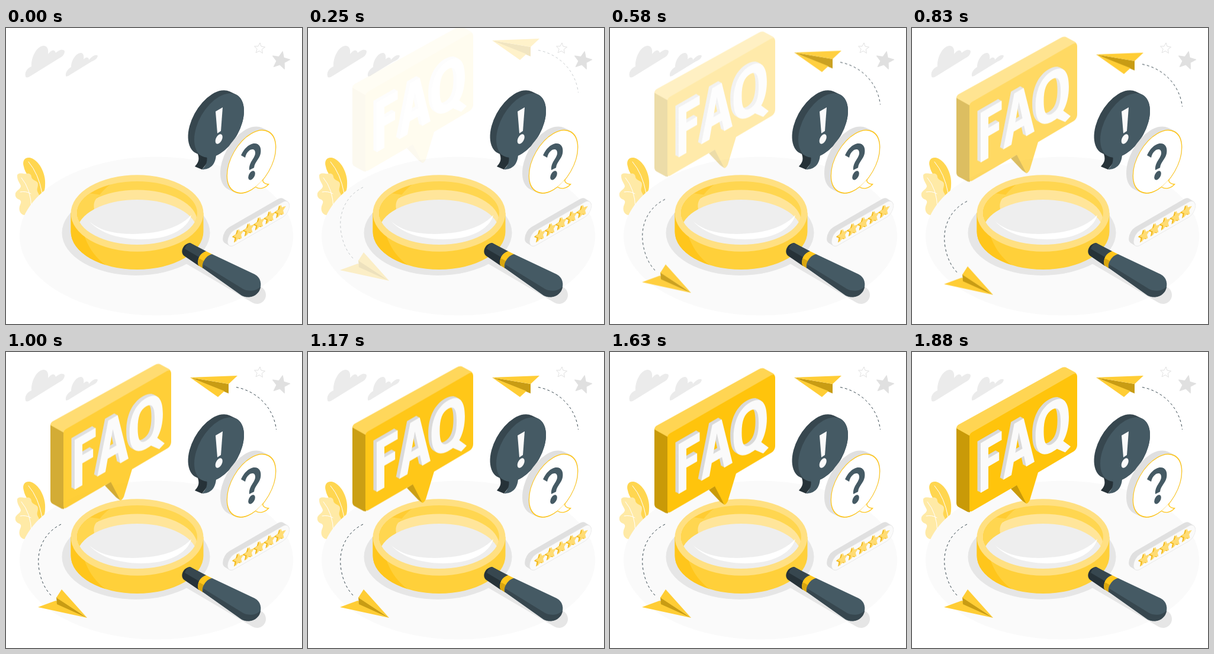
An HTML page for the animation above (1930 ms loop, 500 px wide and 500 px high).

```html
<!DOCTYPE html>
<html lang="en">
<head>
<meta charset="utf-8">
<title>FAQ search</title>
<style>
  html, body { margin: 0; width: 100%; height: 100%; overflow: hidden; background: #fff; }
  svg { display: block; width: 100%; height: 100%; }
  .drop { animation: 1930ms linear infinite; }
  .planes { animation-name: drop-fast; }
  .sign { animation-name: drop-slow; }
  @keyframes drop-fast {
    0% { opacity: 0; transform: translateY(-30px); animation-timing-function: cubic-bezier(.36, -.01, .5, 1.38); }
    48%, 100% { opacity: 1; transform: none; }
  }
  @keyframes drop-slow {
    0% { opacity: 0; transform: translateY(-30px); animation-timing-function: cubic-bezier(.36, -.01, .5, 1.38); }
    96%, 100% { opacity: 1; transform: none; }
  }
  .gold { fill: #ffcd35; }
  .fold { fill: #c89c14; }
  .slate { fill: #455a64; }
  .dark { fill: #37474f; }
  .ink { fill: #263238; }
  .dash { fill: none; stroke: #37474f; stroke-dasharray: 4 4; }
  .round { fill: none; stroke-linecap: round; stroke-linejoin: round; }
</style>
</head>
<body>
<svg viewBox="0 0 500 500">
  <defs>
    <path id="star" d="M0-1L.27-.37L.95-.31L.43.14L.59.81L0 .45L-.59.81L-.43.14L-.95-.31L-.27-.37Z" stroke-linejoin="round"/>
    <g id="rating">
      <use href="#star" transform="translate(-2.4 1) matrix(.866 -.5 0 1 0 0) scale(9.6)" fill="#f2b91a" stroke="#f2b91a" stroke-width=".12"/>
      <use href="#star" transform="matrix(.866 -.5 0 1 0 0) scale(9.6)" fill="#ffdc74" stroke="#ffdc74" stroke-width=".12"/>
    </g>
    <path id="faq" fill-rule="evenodd" transform="matrix(.866 -.5 0 1 116 237)" d="M0 0V-84H41V-69H15V-51H36V-37H15V0Z
      M44 0L65.5-84H84L105 0H89L84.5-20H64.5L60 0ZM67.5-34H81.5L74.5-65Z
      M107-42C107-70 119-85 139.500-85S172-70 172-42C172-26 168-14 161-7L175.500 9.500L165 14L149 0C121 4 107-12 107-42Z
      M123-42C123-22 128-13 139.500-13S156-22 156-42S151-71 139.500-71S123-62 123-42Z"/>
    <clipPath id="lens"><ellipse cx="221.500" cy="312.500" rx="101.500" ry="53.500"/></clipPath>
    <clipPath id="wall"><path d="M109.500 312.500V344A112 64 0 0 0 333.500 344V312.500Z"/></clipPath>
  </defs>

  <!-- sky -->
  <g fill="#ebebeb">
    <path d="M33 82C31 74 36 68 43 65C42 51 51 31 63 30C70 30 72 36 71 44C76 37 82 35 84 42C88 38 96 34 99 39C99 46 94 49 90 51L40 82C36 84 34 84 33 82Z"/>
    <path d="M101 81C100 74 106 68 110 66C110 55 118 42 127 42C131 43 132 48 131 53C134 49 140 48 140 54C146 47 152 44 155 47C154 53 148 55 144 57L105 81C103 82 101 82 101 81Z"/>
  </g>
  <use href="#star" transform="translate(428.300 34.500) rotate(4) scale(9.500)" fill="#fff" stroke="#e0e0e0" stroke-width=".1"/>
  <use href="#star" transform="translate(464 55) rotate(12) scale(15.500)" fill="#e0e0e0" stroke="#e0e0e0" stroke-width=".08"/>

  <!-- leaves and floor -->
  <path fill="#ffd650" d="M30 234C27 224 32 218 40 219C55 222 68 245 66 266C66 276 61 284 56 292L46 268C40 252 32 245 30 234Z"/>
  <path fill="#ffeaa6" d="M19 248C23 243 29 247 35 246C40 245 43 248 43 252C45 259 54 257 54 264C54 270 51 272 54 278C58 284 56 288 50 292L32 316C25 316 21 309 23 301C25 296 27 293 23 290C17 288 15 284 16 279C18 274 25 272 25 267C24 262 18 257 19 248Z"/>
  <g class="round" stroke="#fff">
    <path d="M38 226Q55 246 61 279"/>
    <path d="M26 253Q42 272 43 304M24 277Q34 275 42 280"/>
  </g>
  <ellipse cx="254" cy="351.500" rx="231" ry="134" fill="#fafafa"/>

  <!-- magnifier -->
  <g fill="#e6e6e6">
    <ellipse cx="219.500" cy="346" rx="125" ry="72"/>
    <path d="M310 384L424 451" class="round" stroke="#e6e6e6" stroke-width="30"/>
  </g>
  <g clip-path="url(#wall)">
    <path fill="#ffd03a" d="M109 300H335V410H109Z"/>
    <path fill="#ffc61c" d="M109 300H124C125 352 144 390 184 410H109Z"/>
  </g>
  <ellipse cx="221.500" cy="313" rx="112" ry="64.700" fill="#ffe082"/>
  <g clip-path="url(#lens)">
    <path fill="#ffd650" d="M110 250H335V370H110Z"/>
    <path fill="#ffcc33" d="M110 250H205C174 261 148 280 143 325H110Z"/>
    <ellipse cx="221.500" cy="327" rx="101.500" ry="53.500" fill="#ffe59a"/>
    <path fill="#ffd650" d="M110 275L161 282C150 287 147 296 149 306L110 345Z"/>
    <ellipse cx="221.500" cy="343.500" rx="101.500" ry="53.500" fill="#eee"/>
    <path fill="#fff" d="M141 327C168 351 215 350 251 345C282 340 302 328 313 316C308 335 286 350 255 355C213 361 165 353 141 327Z"/>
  </g>
  <path class="ink" d="M311 363L336 377L326 402L301 385C293 379 299 364 311 363Z"/>
  <path class="dark" d="M311 363L338 377L331 390L302 373C304 367 307 364 311 363Z"/>
  <path fill="#ffc61c" d="M338 377L348 382C340 386 334 395 333 406L325 401C322 390 328 380 338 377Z"/>
  <path fill="#d9a60f" d="M326 389L335 394L333 406L325 401Q323 395 326 389Z"/>
  <path class="slate" d="M348 382L420 416C430 421 433 433 428 443C422 454 408 457 398 452L332 405C330 397 338 384 348 382Z"/>
  <path class="dark" d="M334 400L399 440C409 446 422 445 430 437C429 447 420 454 411 454.500C405 455 400 453 396 450L332 405Z"/>

  <!-- rating card -->
  <g transform="matrix(.866 -.5 0 1 426.500 330.500)" class="round">
    <path d="M-47.500 0H47.500L38.300-9.600H-56.700Z" fill="#e0e0e0" stroke="#e0e0e0" stroke-width="26"/>
    <path d="M-47.500 0H47.500" stroke="#ebebeb" stroke-width="26"/>
    <path d="M-47.500 0H47.500" stroke="#fafafa" stroke-width="24.500"/>
  </g>
  <use href="#rating" x="393" y="350"/>
  <use href="#rating" x="410.800" y="339.800"/>
  <use href="#rating" x="428.600" y="329.600"/>
  <use href="#rating" x="446.300" y="319.300"/>
  <use href="#rating" x="464" y="309"/>

  <!-- exclamation bubble -->
  <path class="ink" d="M324 213C328 224 323 229 319 234L331 239L350 215Z"/>
  <g transform="matrix(.866 -.5 0 1 360 164.500)">
    <path class="round" d="M0 0L-12.100-11.100" stroke="#37474f" stroke-width="97"/>
    <circle r="48.500" class="slate"/>
  </g>
  <path class="slate" d="M338 214C342 223 338 233 331 239C345 239 354 231 355 214Z"/>
  <path fill="#fafafa" d="M354 141L366 134L363 174L357 178Z"/>
  <ellipse transform="matrix(.866 -.5 0 1 359.700 187.500)" rx="7" ry="7.500" fill="#fafafa"/>

  <!-- question bubble -->
  <g transform="matrix(.866 -.5 0 1 414.500 225.700)">
    <path class="round" d="M0 0L-12.100-11.100" stroke="#e0e0e0" stroke-width="97"/>
    <circle r="47.500" fill="#fff" stroke="#ffc61c" stroke-width="1.400"/>
  </g>
  <path fill="#fff" stroke="#ffc61c" stroke-width="1.300" d="M434.500 256C432 260 438 264 443.500 264C437 271 428 273 421.500 268.500"/>
  <path class="slate" d="M397 215C402 204 409 197 418 195C428 194 432 202 430 212C428 222 420 226 419 236L411 240C410 226 421 220 421 211C421 204 415 204 411 207C407 210 405 214 404 219Z"/>
  <ellipse transform="matrix(.866 -.5 0 1 415 249)" rx="6.700" ry="7" class="slate"/>

  <!-- paper planes -->
  <g class="drop planes">
    <path class="dash" d="M389 59.500C423 66 452 93 456.500 131"/>
    <path class="fold" d="M311 43L376 54V70Z"/>
    <path class="gold" d="M311 43L391 40L376 54ZM311 43L358 76L369 66Z"/>
    <path class="dash" d="M93 291C66 304 50 333 56 368C59 386 66 401 77 412"/>
    <path class="gold" d="M54 431L84 420L137 449Z"/>
    <path class="fold" d="M85 414L137 449L86 426Z"/>
    <path class="gold" d="M94 401L137 449L85 415Z"/>
  </g>

  <!-- sign -->
  <g class="drop sign" role="img" aria-label="FAQ">
    <g transform="translate(0 1)">
      <path fill="#c99a08" d="M75 127L98 136V269.500Q95 270 92 268L79 261Q75 259 75 254ZM167 230L181 221L193 255L186 250Z"/>
      <path fill="#ffd553" d="M75 128Q75 124 79 121.500L251 26.500Q257 23 262 26L275 33Q279 35 278 41L100 142Z"/>
      <path fill="#ffc40c" d="M97 142Q97 137 101.500 134.500L272 36.500Q279 33 279 41V156Q279 163 273 167L213 202.500L199 249Q196 255 193 255L177 224L103 267Q97 271 97 264Z"/>
      <g fill="#d9d9d9">
        <use href="#faq" x="-5.500" y="-3"/>
        <use href="#faq" x="-4.400" y="-2.400"/>
        <use href="#faq" x="-3.300" y="-1.800"/>
        <use href="#faq" x="-2.200" y="-1.200"/>
        <use href="#faq" x="-1.100" y="-.6"/>
      </g>
      <use href="#faq" fill="#fafafa"/>
    </g>
  </g>
</svg>
</body>
</html>
```
